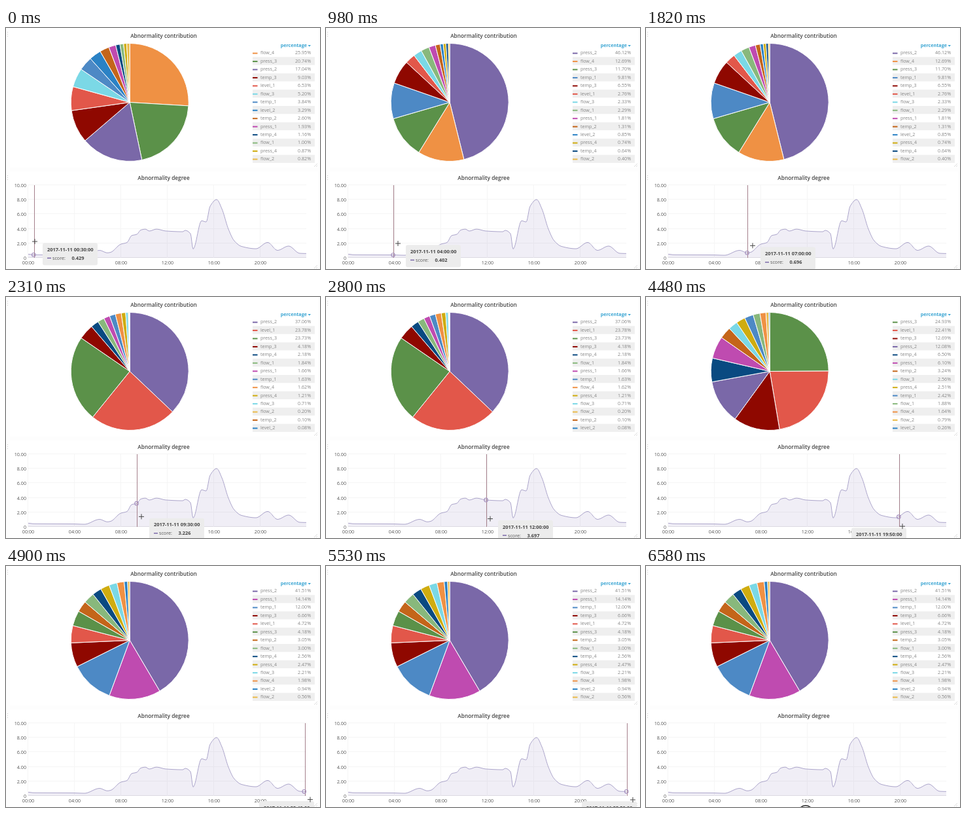
Recreate the animation shown at these times as an HTML page with a canvas. Size 480 by 368 pixels, loop 6650 ms.

```html
<!DOCTYPE html>
<html lang="en">
<head>
<meta charset="utf-8">
<title>Abnormality dashboard</title>
<style>
html, body { margin: 0; width: 100%; height: 100%; overflow: hidden; background: #fff; }
canvas { display: block; }
</style>
</head>
<body>
<canvas id="stage" width="480" height="368"></canvas>
<script>
const ctx = document.getElementById('stage').getContext('2d');
const LOOP = 6650, LEAVE = 5740, STEP = 70;
const LEFT = 34, RIGHT = 459, BASE = 351, UNIT = 11.1;
const FONT = '"Open Sans", "Noto Sans", sans-serif';

const colors = {
  flow_1: '#88b87c', flow_2: '#eabb4a', flow_3: '#7bd8e6', flow_4: '#ef9144',
  press_1: '#bf4bb0', press_2: '#7a68a8', press_3: '#5b9149', press_4: '#cfac10',
  temp_1: '#4d89c5', temp_2: '#c4651a', temp_3: '#8f0800', temp_4: '#094a81',
  level_1: '#e2574a', level_2: '#2b82c5'
};

// Legend contents, each shown from its start time on
const tables = [
  [0, 'flow_4 25.95 press_3 20.74 press_2 17.04 temp_3 9.03 level_1 6.53 flow_3 5.20 temp_1 3.84 level_2 3.29 temp_2 2.60 press_1 1.93 temp_4 1.16 flow_1 1.00 press_4 0.87 flow_2 0.82'],
  [560, 'press_2 46.12 flow_4 12.69 press_3 11.70 temp_1 9.81 temp_3 6.55 level_1 2.76 flow_3 2.33 flow_1 2.29 press_1 1.81 temp_2 1.31 level_2 0.85 press_4 0.74 temp_4 0.64 flow_2 0.40'],
  [2310, 'press_2 37.06 level_1 23.78 press_3 23.73 temp_3 4.18 temp_4 2.18 flow_1 1.84 press_1 1.66 temp_1 1.63 flow_4 1.62 press_4 1.21 flow_3 0.71 flow_2 0.20 temp_2 0.10 level_2 0.08'],
  [3640, 'press_3 24.93 level_1 22.41 temp_3 12.69 press_2 12.08 temp_4 6.50 press_1 6.10 temp_2 3.24 flow_3 2.56 press_4 2.51 temp_1 2.42 flow_1 1.88 flow_4 1.64 flow_2 0.79 level_2 0.26'],
  [4900, 'press_2 41.51 press_1 14.14 temp_1 12.00 temp_3 6.66 level_1 4.72 press_3 4.18 temp_2 3.05 flow_1 3.00 temp_4 2.56 press_4 2.47 flow_3 2.21 flow_4 1.98 level_2 0.94 flow_2 0.56']
].map(([start, text]) => ({ start, rows: text.match(/\S+ \S+/g).map(row => row.split(' ')) }));

// Turning points of the score: stage x, score
const knots = [
  [34, 0.5], [42.5, 0.429], [102.5, 0.402], [120, 0.36], [143, 1.03], [155, 0.695],
  [160, 0.77], [175, 1.86], [185, 2.12], [192, 3.06], [200, 3.24], [206, 3.83],
  [213, 3.95], [219, 3.7], [230, 3.95], [244.5, 3.698], [270, 3.6], [274, 3.78],
  [282, 3.33], [286, 1.22], [299, 5.1], [306, 4.95], [312, 7.1], [322, 8.02],
  [330, 6.75], [340, 3.96], [349, 2.34], [360, 1.58], [382, 1.26], [400, 2.12],
  [415, 1.04], [432, 1.62], [449, 0.63], [459, 0.6]
];

// Pointer path: time, pointer x, guide x, minutes
const path = [
  [0, 44, 43.5, 30], [980, 110, 103.8, 240], [1820, 163, 155.8, 420], [2800, 251, 245.8, 720],
  [4480, 392, 387.5, 1190], [4900, 465, 457, 1420], [5530, 469, 460.5, 1430], [LEAVE, 481, 460.5, 1430]
];

function segment(points, at) {
  let i = 1;
  while (i < points.length - 1 && points[i][0] < at) i++;
  return i;
}

function mix(points, at) {
  const i = segment(points, at), a = points[i - 1], b = points[i];
  const k = (at - a[0]) / (b[0] - a[0]);
  return a.map((v, n) => v + (b[n] - v) * k);
}

const slope = i => {
  const a = knots[i - 1], b = knots[i];
  return a && b ? (b[1] - a[1]) / (b[0] - a[0]) : 0;
};

// Harmonic mean of both slopes: smooth, without overshoot
const tangent = i => {
  const a = slope(i), b = slope(i + 1);
  return a * b > 0 ? 2 * a * b / (a + b) : 0;
};

function score(x) {
  const i = segment(knots, x), [x0, a] = knots[i - 1], [x1, b] = knots[i];
  const w = x1 - x0, k = Math.min(1, (x - x0) / w), r = 1 - k;
  return a + (b - a) * k * k * (3 - 2 * k) + w * k * r * (r * tangent(i - 1) - k * tangent(i));
}

const levelY = value => BASE - value * UNIT;
const curve = Array.from({ length: RIGHT - LEFT + 1 }, (_, i) => [LEFT + i, levelY(score(LEFT + i))]);

function label(text, x, y, size, color, align = 'left', weight = 400) {
  ctx.font = `${weight} ${size}px ${FONT}`;
  ctx.fillStyle = color;
  ctx.textAlign = align;
  ctx.fillText(text, x, y + size * 0.36);
}

function box(x, y, w, h, color) {
  ctx.fillStyle = color;
  ctx.fillRect(x, y, w, h);
}

function line(points, color, width = 1) {
  ctx.beginPath();
  points.forEach(p => ctx.lineTo(p[0], p[1]));
  ctx.strokeStyle = color;
  ctx.lineWidth = width;
  ctx.stroke();
}

function circle(x, y, r, color, width) {
  ctx.beginPath();
  ctx.arc(x, y, r, 0, Math.PI * 2);
  ctx.strokeStyle = color;
  ctx.lineWidth = width;
  ctx.stroke();
}

function panels() {
  box(0, 0, 480, 368, '#fdfdfd');
  for (const [top, height] of [[0, 213], [219, 149]]) {
    box(6, top, 471, height, '#fff');
    for (let i = 0; i < 3; i++) box(2, top + 6 + i * 3, 1, 1, '#ccc');
    const low = Math.min(top + height - 1, 367);
    for (const d of [5, 2]) line([[476 - d, low], [476, low - d]], '#ddd');
  }
  label('Abnormality contribution', 241, 12, 8.3, '#444', 'center', 600);
  label('Abnormality degree', 241, 229, 8.3, '#444', 'center', 600);
}

function pie(rows) {
  const x = 189.2, y = 113.5;
  let angle = -Math.PI / 2;
  for (const [name, share] of rows) {
    const end = angle + share / 50 * Math.PI;
    ctx.beginPath();
    ctx.moveTo(x, y);
    ctx.arc(x, y, 90, angle, end);
    ctx.closePath();
    ctx.fillStyle = colors[name];
    ctx.fill();
    ctx.strokeStyle = '#fff';
    ctx.lineWidth = 1;
    ctx.stroke();
    angle = end;
  }
}

function legend(rows) {
  label('percentage', 460, 26.7, 7.2, '#3aa5d3', 'right', 700);
  ctx.beginPath();
  ctx.moveTo(461.5, 26);
  ctx.lineTo(466, 26);
  ctx.lineTo(463.75, 28.5);
  ctx.fill();
  rows.forEach(([name, share], i) => {
    const y = 37.9 + i * 12.45;
    if (i % 2) box(377, y - 6, 95, 12.2, '#efefef');
    box(377, y - 0.3, 7.5, 2, colors[name]);
    label(name, 389, y, 7.1, '#858585');
    label(share + '%', 466, y, 7.1, '#858585', 'right');
  });
}

function chart() {
  for (let i = 0; i < 6; i++) {
    const y = Math.round(levelY(i * 2)) - 0.5, x = LEFT - 0.5 + i * 71;
    line([[LEFT, y], [RIGHT, y]], i ? '#f5f5f5' : '#e8e8e8');
    line([[x, 240], [x, BASE]], '#f5f5f5');
    label(i ? (i * 2).toFixed(2) : '0', 31, y + 1, 7.2, '#555', 'right');
    label(String(i * 4).padStart(2, '0') + ':00', x + 0.5, 358, 7.2, '#555', 'center');
  }
  ctx.beginPath();
  [...curve, [RIGHT, BASE], [LEFT, BASE]].forEach(p => ctx.lineTo(p[0], p[1]));
  ctx.fillStyle = 'rgba(122, 104, 168, 0.11)';
  ctx.fill();
  line(curve, '#aca5cb');
}

function tooltip(x, y, minutes, value) {
  ctx.beginPath();
  ctx.roundRect(x, y, 84, 34, 3);
  ctx.fillStyle = '#ececec';
  ctx.fill();
  const two = n => String(n).padStart(2, '0');
  const clock = `${two(Math.floor(minutes / 60))}:${two(minutes % 60)}:00`;
  label('2017-11-11 ' + clock, x + 7, y + 10, 7.45, '#444', 'left', 700);
  box(x + 7, y + 22.3, 6, 1.5, '#7a68a8');
  label('score:', x + 15, y + 23, 7.2, '#555');
  label(value.toFixed(3), x + 44.5, y + 23, 7.4, '#444', 'left', 700);
}

function hover(t) {
  const [, x, guide, minutes] = mix(path, t);
  const y = 326 + 31 * Math.max(0, (x - 44) / 425) ** 1.25;
  const marker = guide - 1.2, value = score(marker);
  const gx = Math.floor(guide) + 0.5;
  line([[gx, 240], [gx, BASE]], '#a5808c');
  circle(marker, levelY(value), 2.8, '#a58fbd', 1.1);
  tooltip(x > 384 ? x - 78 : x + 12, y + 2.3, Math.round(minutes / 10) * 10, value);
  line([[x - 4, y], [x + 4, y]], '#444');
  line([[x, y - 4], [x, y + 4]], '#444');
}

function draw(t) {
  const { rows } = tables.findLast(s => s.start <= t);
  panels();
  pie(rows);
  legend(rows);
  chart();
  if (t < LEAVE) hover(t);
  if (t > 6370) circle(244, Math.max(377, 382 - (t - 6370) / 40), 11.3, '#222', 1.5);
}

ctx.lineJoin = 'round';
const start = performance.now();
function tick() {
  const t = (performance.now() - start) % LOOP;
  draw(Math.floor(t / STEP) * STEP);
  requestAnimationFrame(tick);
}
tick();
</script>
</body>
</html>
```
